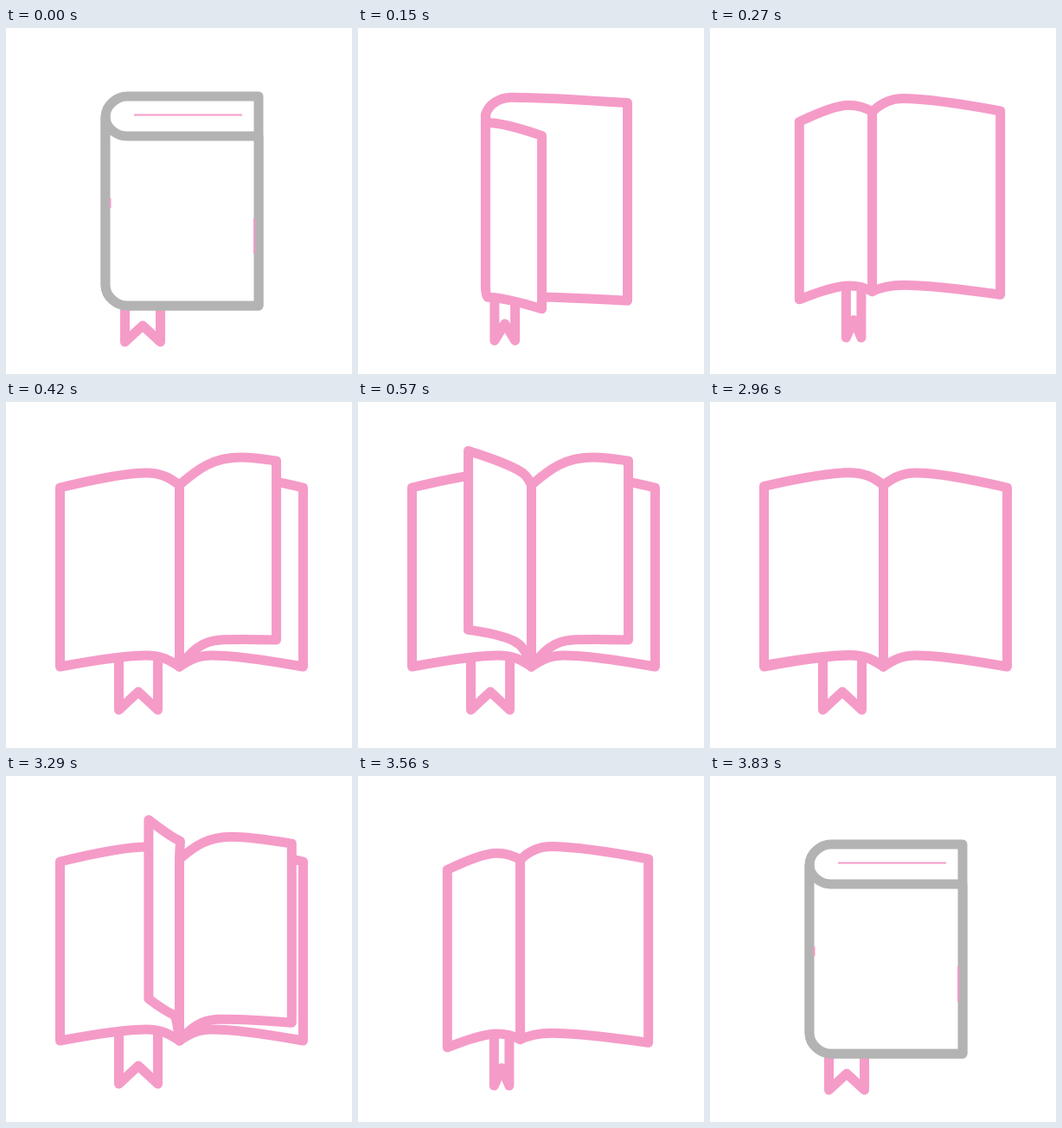
Recreate the animation shown at these times as an HTML page. Size 400x400 px, loop 4860 ms.

```html
<!DOCTYPE html>
<html lang="en">
<head>
<meta charset="utf-8">
<title>Opening book</title>
<style>
  html, body { margin: 0; width: 100%; height: 100%; overflow: hidden; background: #fff; }
  svg { display: block; width: 100%; height: 100%; }
  path { fill: #fff; stroke: #f59bc8; stroke-width: 11; stroke-linejoin: round; stroke-linecap: round; }
  .closed .cover { stroke: #b3b3b3; }
  #details { fill: none; stroke-width: 2; stroke-linecap: butt; }
</style>
</head>
<body>
<svg id="book" viewBox="0 0 400 400">
  <path id="ribbon"/>
  <path id="back" class="cover"/>
  <path id="front" class="cover"/>
  <path id="second"/>
  <path id="first"/>
  <path id="details" d="M148 100.5H273M287 220V261M120.5 197V208"/>
</svg>
<script>
const LOOP = 4860, STEP = 30, OPENED = 900, CLOSE_START = 2960, CLOSE_END = 3830;
const COVER_TIME = 358, PAGE_TIME = 465;
const el = id => document.getElementById(id);
const mix = (a, b, t) => a + (b - a) * t;
const mixAll = (a, b, t) => a.map((v, i) => mix(v, b[i], t));
const ease = (t, start, length) => {
  const x = Math.min(1, Math.max(0, (t - start) / length));
  return x * x * (3 - 2 * x);
};

// An edge runs from the spine over a bend to the outer corner, relative to the spine:
// [bend x, bend y, slope at bend, corner x, corner y]
const EDGES = {
  backTop:     [[25, -24, 0, 177, -24], [38, -14, 0, 143, 3]],
  backBottom:  [[25, 24, 0, 177, 24],   [38, -13, 0, 143, 0]],
  frontTop:    [[25, 22, 0, 177, 22],   [-38, -14, 0, -138, 3]],
  frontBottom: [[25, 24, 0, 177, 24],   [-38, -13, 0, -138, 0]]
};

// Bends of a turning page at four moments of its turn
const TURN = [0, 0.21, 0.67, 1];
const TOP_BENDS = [[38, -14, 0], [72, -32, 0], [-16, -18, 0.55], [-38, -14, 0]];
const BOTTOM_BENDS = [[38, -13, 0], [48, -31, -0.05], [-20, -30, 0.5], [-38, -13, 0]];

function sheet(spine, top, bottom, tuck) {
  const points = ([mx, my, slope, ex, ey], y) => {
    const at = (dx, dy) => `${(spine.x + dx).toFixed(2)} ${(y + dy).toFixed(2)} `;
    const inner = 0.45 * Math.abs(mx) * Math.sign(ex - mx), outer = 0.3 * (ex - mx);
    return {
      root: at(0, 0),
      start: at(tuck * mx, 0.6 * my),
      before: at(mx - inner, my - slope * inner),
      bend: at(mx, my),
      after: at(mx + outer, my + slope * outer),
      corner: at(ex, ey)
    };
  };
  const a = points(top, spine.top), b = points(bottom, spine.bottom);
  return `M${a.root}C${a.start}${a.before}${a.bend}Q${a.after}${a.corner}` +
    `L${b.corner}Q${b.after}${b.bend}C${b.before}${b.start}${b.root}Z`;
}

function turningPage(spine, turn) {
  if (turn <= 0 || turn >= 1) return "";
  const i = TURN.findIndex(v => v > turn) - 1;
  const part = (turn - TURN[i]) / (TURN[i + 1] - TURN[i]);
  const angle = turn * Math.PI, c = Math.cos(angle);
  const x = c * (140.5 + 2.5 * c), lift = 50 * Math.sin(angle);
  const edge = (bends, y) => [...mixAll(bends[i], bends[i + 1], part), x, y - lift];
  return sheet(spine, edge(TOP_BENDS, 3), edge(BOTTOM_BENDS, 0), 0.3);
}

function ribbon(spine, t) {
  const swing = ease(t, 39, COVER_TIME), twist = ease(t, 47, COVER_TIME);
  const center = spine.x + mix(43, -47.5, swing), half = mix(20.5, -22.5, twist);
  const top = mix(321, 296, swing), end = mix(363, 356, swing), notch = mix(344, 335, swing);
  return `M${center - half} ${top}V${end}L${center} ${notch}L${center + half} ${end}V${top}`;
}

function draw(t) {
  const open = ease(t, 0, COVER_TIME), swing = ease(t, 6, COVER_TIME);
  const spine = { x: mix(115, 200.5, open), top: mix(103, 96, open), bottom: mix(297, 306, open) };
  const edge = (name, amount, drop = 0) => {
    const e = mixAll(...EDGES[name], amount);
    e[4] += drop;
    return e;
  };
  const drop = 10 * Math.sin(Math.PI * swing), tuck = 0.3 * open;
  const set = (id, d) => el(id).setAttribute("d", d);

  set("ribbon", ribbon(spine, t));
  set("back", sheet(spine, edge("backTop", open), edge("backBottom", open), tuck));
  set("front", sheet(spine, edge("frontTop", swing, drop), edge("frontBottom", swing, drop), tuck));
  set("first", turningPage(spine, ease(t, 282, PAGE_TIME)));
  set("second", turningPage(spine, ease(t, 432, PAGE_TIME)));

  // The page nearer the viewer is on top: the first on the right, the second on the left
  const upper = el(t < 600 ? "first" : "second");
  if (el("details").previousElementSibling !== upper) el("book").insertBefore(upper, el("details"));

  const closed = t < STEP;
  el("book").classList.toggle("closed", closed);
  el("details").style.display = closed ? "" : "none";
}

const stepped = t => Math.floor(t / STEP) * STEP;

function frame() {
  const t = performance.now() % LOOP;
  draw(t < CLOSE_START
    ? Math.min(OPENED, stepped(t))
    : Math.max(0, CLOSE_END - CLOSE_START - stepped(t - CLOSE_START)));
  requestAnimationFrame(frame);
}
frame();
</script>
</body>
</html>
```
